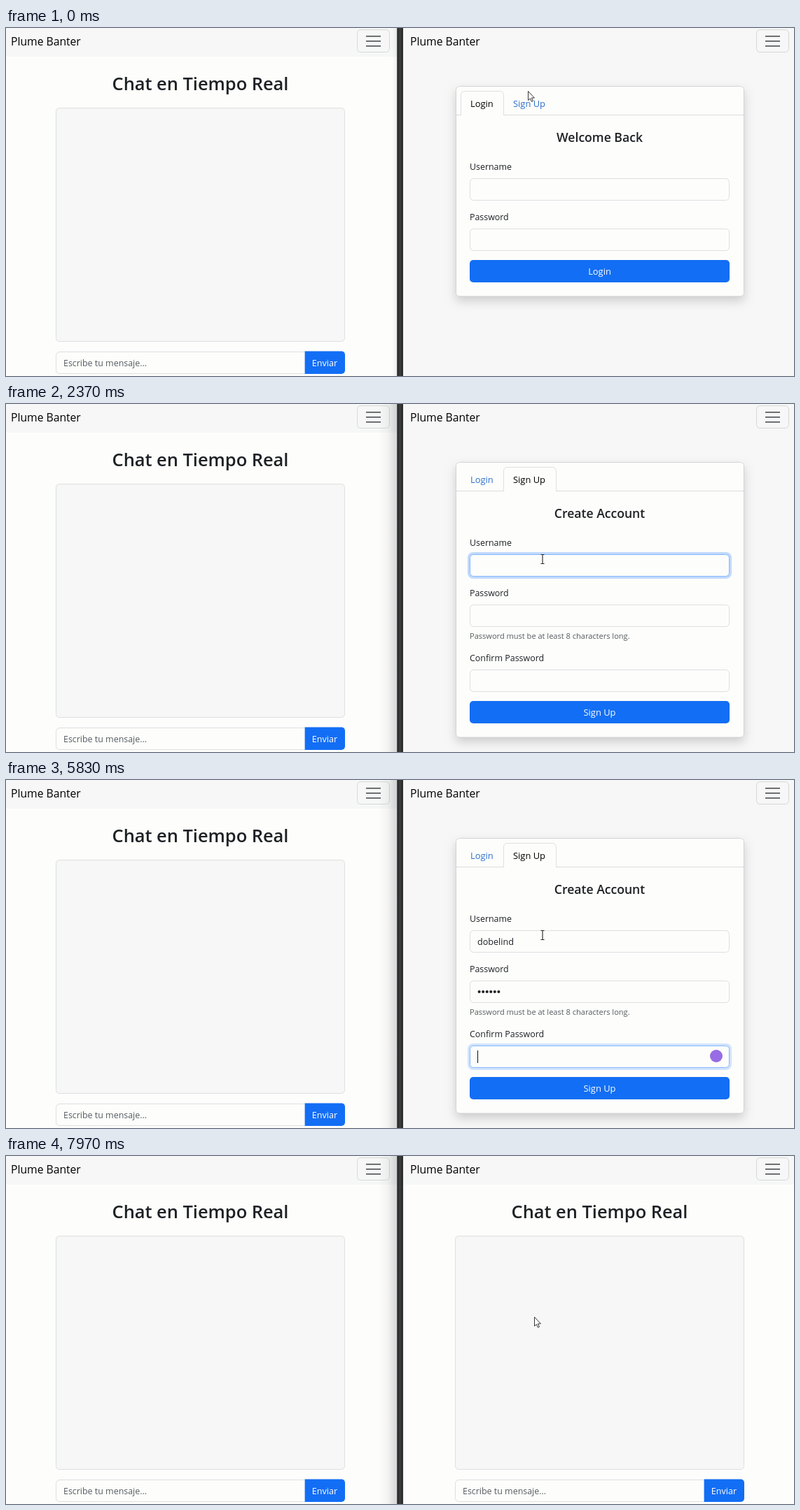
An HTML page with a canvas for the animation above (8000 ms loop, 1125 px wide and 498 px high).

```html
<!DOCTYPE html>
<html lang="es">
<head>
<meta charset="utf-8">
<title>Chat</title>
<style>
html, body { margin: 0; width: 100%; height: 100%; overflow: hidden; background: #fdfdfc; }
canvas { display: block; width: 100%; height: 100%; }
</style>
</head>
<body>
<canvas id="stage"></canvas>
<script>
const W = 1125, H = 498, LOOP = 8000, SHIFT = 570;
const canvas = document.getElementById('stage');
const ctx = canvas.getContext('2d');
const ratio = window.devicePixelRatio || 1;
canvas.width = Math.round(W * ratio);
canvas.height = Math.round(H * ratio);

const SANS = '"Open Sans", "Noto Sans", sans-serif';
const MONO = '"Noto Sans Mono", "DejaVu Sans Mono", monospace';
const C = {
  page: '#fdfdfb', soft: '#f6f7f6', ink: '#1d2125', muted: '#565b61',
  line: '#dcdfe3', blue: '#126ef4', link: '#2d70cc'
};
const BRAND = 'Plume Banter';
const USER = 'dobelind';

// Moments of the story, in ms
const CLICK = 530, FADE = 150, USER_FOCUS = 1560, PASS_FOCUS = 4380,
      CONFIRM_FOCUS = 5720, DONE = 7640;
const userKeys = [2450, 2630, 2800, 2990, 3160, 3340, 3520, 3800];
const passKeys = [4930, 5060, 5190, 5320, 5450, 5580];
const confirmKeys = [5980, 6130, 6280, 6430, 6580, 6730];

const clamp = v => Math.max(0, Math.min(1, v));
const typed = (keys, t) => keys.filter(k => k <= t).length;

function text(str, x, y, size, color = C.ink, align = 'left', weight = 400, family = SANS) {
  ctx.font = `${weight} ${size}px ${family}`;
  ctx.textAlign = align;
  ctx.fillStyle = color;
  ctx.fillText(str, x, y);
}

function box(x, y, w, h, r, fill, stroke) {
  ctx.beginPath();
  ctx.roundRect(x, y, w, h, r);
  if (fill) { ctx.fillStyle = fill; ctx.fill(); }
  if (stroke) { ctx.strokeStyle = stroke; ctx.lineWidth = 1; ctx.stroke(); }
}

function rect(x, y, w, h, fill) {
  ctx.fillStyle = fill;
  ctx.fillRect(x, y, w, h);
}

function disc(x, y, r, fill) {
  ctx.beginPath();
  ctx.arc(x, y, r, 0, 7);
  ctx.fillStyle = fill;
  ctx.fill();
}

function navbar(dx) {
  rect(dx, 0, 560, 41, C.soft);
  text(BRAND, dx + 7, 25, 15.7, '#000');
  box(dx + 501.5, 2.5, 46, 32, 5, null, '#d6d8d9');
  for (const y of [11, 18, 25]) rect(dx + 514, y, 21, 1.6, '#4d5053');
}

function chatPage(dx) {
  rect(dx, 0, 560, H, C.page);
  navbar(dx);
  text('Chat en Tiempo Real', dx + 277.5, 89, 25.4, C.ink, 'center', 600);
  box(dx + 71.5, 114.5, 412, 334, 5, C.soft, C.line);
  box(dx + 71.5, 463.5, 357, 31, [5, 0, 0, 5], C.page, C.line);
  text('Escribe tu mensaje...', dx + 82, 484, 12.45, C.muted);
  box(dx + 426.6, 462.6, 57.4, 32.4, [0, 5, 5, 0], C.blue);
  text('Enviar', dx + 455, 484, 12.6, '#fff', 'center');
}

function field(y, focusAge = -1) {
  const f = clamp(focusAge / FADE);
  if (f > 0) box(659, y - 3, 377, 38, 8, `rgba(13,110,253,${0.25 * f})`);
  box(662.5, y + 0.5, 370, 31, 5, C.page, f > 0 ? '#86b7fe' : C.line);
}

function caret(x, y, age) {
  if (age >= 0 && age % 1000 < 500) rect(x, y + 7, 1, 18, '#111');
}

function dots(n, y) {
  for (let i = 0; i < n; i++) disc(675.6 + i * 5.55, y + 16, 2.05, C.ink);
}

function button(label, y) {
  box(662, y, 371, 32, 5, C.blue);
  text(label, 847.5, y + 21, 12.9, '#fff', 'center');
}

function eye(x, y) {
  ctx.strokeStyle = '#222';
  ctx.lineWidth = 1.4;
  ctx.beginPath();
  ctx.moveTo(x - 7.5, y + 1);
  ctx.bezierCurveTo(x - 5, y - 6.5, x + 5, y - 6.5, x + 7.5, y + 1);
  ctx.stroke();
  ctx.beginPath();
  ctx.arc(x, y + 1, 3, 0, 7);
  ctx.stroke();
}

function secretField(y, keys, focus, blur, t) {
  const active = t >= focus && t < blur;
  const n = typed(keys, t);
  field(y, active ? t - focus : -1);
  dots(n, y);
  if (!active) return;
  caret(673 + n * 5.55, y, t - (n ? keys[n - 1] : focus));
  if (n) eye(986, y + 16);
  disc(1014, y + 15, 9, '#986ce4');
}

function popup() {
  ctx.save();
  ctx.shadowColor = 'rgba(0,0,0,.3)';
  ctx.shadowBlur = 8 * ratio;
  ctx.shadowOffsetY = 2 * ratio;
  box(823, 319, 210, 77, 8, '#1b1928');
  ctx.restore();

  disc(993, 335.5, 10, '#2d2b3e');
  disc(1016, 335.5, 10, '#2d2b3e');
  ctx.strokeStyle = '#aaa6c0';
  ctx.lineWidth = 1;
  ctx.beginPath();
  for (let i = 0; i <= 32; i++) {
    const a = i / 32 * Math.PI * 2, r = 4.7 + 0.7 * Math.cos(a * 8);
    ctx.lineTo(993 + r * Math.cos(a), 335.5 + r * Math.sin(a));
  }
  ctx.stroke();
  ctx.beginPath();
  ctx.arc(993, 335.5, 1.9, 0, 7);
  ctx.stroke();
  for (const d of [-3.5, 0, 3.5]) disc(1016, 335.5 + d, 0.9, '#b5b1c8');

  box(837, 356, 30, 30, 9, '#3a2a36');
  ctx.strokeStyle = '#e79a98';
  ctx.lineWidth = 1.2;
  ctx.beginPath();
  ctx.arc(854.5, 368.5, 4.3, 0, 7);
  ctx.moveTo(851.4, 371.6);
  ctx.lineTo(845.5, 377.5);
  ctx.lineTo(848.5, 377.5);
  ctx.lineTo(848.5, 375);
  ctx.stroke();
  disc(855.6, 367.4, 0.9, '#e79a98');

  text('Completar la contraseña', 877, 368.3, 11, '#fff');
  text('tGmLqZWsabk4d9x6#hRu', 877, 383, 9.25, '#cdc8df', 'left', 400, MONO);
}

function tooltip() {
  box(797.5, 319.5, 100, 19, 0, '#3c3c3c', '#d4d4d4');
  text('Rellene este campo.', 802.5, 332.8, 9.5, '#fff');
}

function loginPane() {
  text('Welcome Back', 847.5, 163, 17.6, C.ink, 'center', 600);
  text('Username', 662, 203, 12.4);
  field(215);
  text('Password', 662, 275, 12.4);
  field(287);
  button('Login', 332);
}

function signupPane(t) {
  text('Create Account', 847.5, 163, 17.6, C.ink, 'center', 600);
  text('Username', 662, 203, 12.4);
  const onUser = t >= USER_FOCUS && t < PASS_FOCUS;
  const n = typed(userKeys, t), name = USER.slice(0, n);
  field(215, onUser ? t - USER_FOCUS : -1);
  text(name, 673, 235.5, 12.6);
  if (onUser) {
    const end = Math.round(673 + ctx.measureText(name).width);
    caret(end, 215, t - (n ? userKeys[n - 1] : USER_FOCUS));
  }
  text('Password', 662, 275, 12.4);
  text('Password must be at least 8 characters long.', 662, 335.5, 11.05, C.muted);
  secretField(287, passKeys, PASS_FOCUS, CONFIRM_FOCUS, t);
  text('Confirm Password', 662, 368, 12.45);
  secretField(380, confirmKeys, CONFIRM_FOCUS, DONE, t);
  button('Sign Up', 425);
  if (t >= PASS_FOCUS + 120 && t < passKeys[0]) {
    popup();
    tooltip();
  }
}

function tab(x, w, label, active) {
  if (active) {
    box(x + 0.5, 90.5, w, 36, [5, 5, 0, 0], C.page, C.line);
    rect(x - 1, 125, w + 3, 3, C.page);
  }
  text(label, x + 14, 112.5, 12.9, active ? '#000' : C.link);
}

function accountPage(t) {
  rect(SHIFT - 3, 0, 560, H, C.soft);
  navbar(SHIFT);
  const swapped = t >= CLICK + FADE, signing = t >= CLICK;
  const h = swapped ? 394 : 301;
  ctx.save();
  ctx.shadowColor = 'rgba(0,0,0,.17)';
  ctx.shadowBlur = 13.5 * ratio;
  ctx.shadowOffsetY = 6.7 * ratio;
  box(642, 83, 412, h, 5, C.page);
  ctx.restore();
  box(642.5, 83.5, 411, h - 0.5, 5, C.page, '#d2d4d6');
  rect(643, 124, 410, 1, '#d9dbe0');
  tab(649, 61, 'Login', !signing);
  tab(710, 75, 'Sign Up', signing);

  ctx.save();
  if (swapped) {
    ctx.globalAlpha = clamp((t - CLICK - FADE) / FADE);
    signupPane(t);
  } else {
    ctx.globalAlpha = 1 - clamp((t - CLICK) / FADE);
    loginPane();
  }
  ctx.restore();
}

function shade(from, to, alpha) {
  const g = ctx.createLinearGradient(from, 0, to, 0);
  g.addColorStop(0, 'rgba(20,22,35,0)');
  g.addColorStop(0.5, `rgba(20,22,35,${alpha * 0.25})`);
  g.addColorStop(1, `rgba(20,22,35,${alpha})`);
  rect(Math.min(from, to), 0, Math.abs(to - from), H, g);
}

function divider(t) {
  if (t < CLICK) shade(550, 558, 0.08);
  else shade(532, 558, 0.17);
  rect(558, 0, 9, H, '#2f3032');
  rect(558, 0, 1, H, '#505153');
  rect(562, 0, 1, H, '#48494b');
}

// Pointer path: time, x, y
const path = [
  [0, 745, 90], [260, 765, 103], [430, 769, 107], [860, 769, 107],
  [1160, 768, 208], [1270, 768, 219], [1480, 766, 222],
  [DONE + 60, 766, 222], [7900, 754, 230], [LOOP, 754, 230]
];

function pointerAt(t) {
  const i = Math.max(1, path.findIndex(p => p[0] > t));
  const [t0, x0, y0] = path[i - 1], [t1, x1, y1] = path[i];
  const k = clamp((t - t0) / (t1 - t0)), e = k * k * (3 - 2 * k);
  return [x0 + (x1 - x0) * e, y0 + (y1 - y0) * e];
}

function outline(d) {
  const p = new Path2D(d);
  ctx.fillStyle = '#fff';
  ctx.fill(p);
  ctx.strokeStyle = '#2c2c2c';
  ctx.lineWidth = 0.95;
  ctx.lineJoin = 'round';
  ctx.stroke(p);
}

function pointer(t) {
  const [x, y] = pointerAt(t);
  ctx.save();
  ctx.translate(Math.round(x), Math.round(y));
  if (t < DONE && y > 90.5 && y < 125) {
    outline('M-2 1.5Q-2-.5-.4-.5T1.2 1.5V7Q1.4 5.6 2.8 5.7T4.3 7Q4.6 6 5.8 6.2T7 7.7Q7.4 7 8.4 7.3T9.4 9V13.5Q9.3 15.5 8 17.5V20H.5V18.4Q-1.5 16.4-3 13.6-4.8 11.5-4.6 10.3-3.6 9-2 11Z');
    ctx.beginPath();
    for (const fx of [1.2, 4.2, 7]) { ctx.moveTo(fx, 7); ctx.lineTo(fx, 11); }
    ctx.stroke();
  } else if (t < DONE && y >= 215) {
    ctx.strokeStyle = '#222';
    ctx.lineWidth = 1.1;
    ctx.stroke(new Path2D('M-2.5-6.5H-.5L0-6 .5-6.5H2.5M0-6V6M-2.5 6.5H-.5L0 6 .5 6.5H2.5'));
  } else {
    outline('M.5.5V13.5L3.4 10.8 5.4 15.4 7.4 14.5 5.4 10H9.4Z');
  }
  ctx.restore();
}

function draw(t) {
  ctx.setTransform(canvas.width / W, 0, 0, canvas.height / H, 0, 0);
  if (t < DONE) accountPage(t);
  else chatPage(SHIFT);
  chatPage(0);
  rect(560, 0, 10, H, t < DONE ? C.soft : C.page);
  if (t >= DONE) rect(567, 0, 3, 41, C.soft);
  divider(t);
  pointer(t);
}

const start = performance.now();
function frame() {
  draw((performance.now() - start) % LOOP);
  requestAnimationFrame(frame);
}
frame();
</script>
</body>
</html>
```
